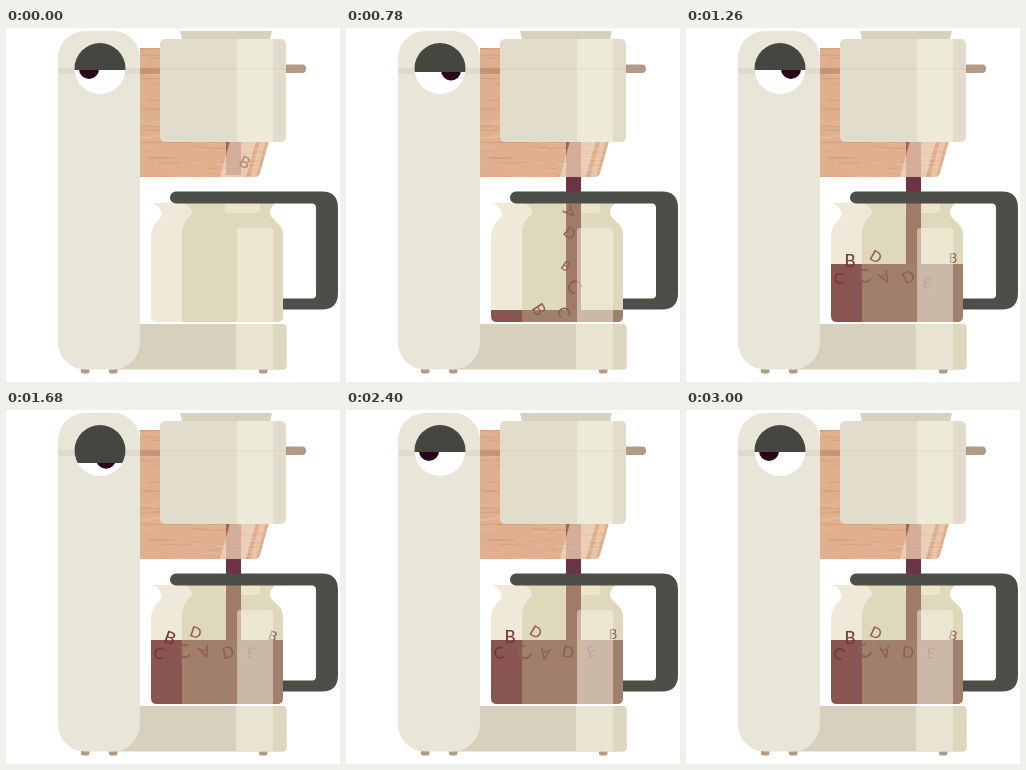
An HTML page with a canvas that plays this animation: 334x354 px, repeating every 3.06 s.

```html
<!DOCTYPE html>
<html lang="en">
<head>
<meta charset="utf-8">
<title>Coffee machine</title>
<style>
html, body { margin: 0; width: 100%; height: 100%; overflow: hidden; background: #fff; }
canvas { display: block; width: 334px; height: 354px; }
</style>
</head>
<body>
<canvas id="stage"></canvas>
<script>
const LOOP = 3060, W = 334, H = 354;
const canvas = document.getElementById('stage');
const dpr = window.devicePixelRatio || 1;
canvas.width = W * dpr;
canvas.height = H * dpr;
const c = canvas.getContext('2d');
c.scale(dpr, dpr);

const LID = [[0, 42], [60, 42], [300, 67], [480, 67], [660, 52], [780, 44], [840, 42],
  [1580, 42], [1680, 53], [1800, 67], [1920, 67], [2160, 42]];
const PUPIL = [[0, 83], [300, 83], [480, 105], [1560, 105], [1680, 100], [1860, 83]];
const LEVEL = [[570, 295], [780, 282], [1080, 252], [1260, 236], [1380, 231], [1500, 230]];
const TURN_AT = [1260, 1680, 2400, 3000];

// ch: glyph, size, x and dy: floating place, start: release time, turns: angles at TURN_AT
const LETTERS = [
  { ch: 'B', size: 17, x: 164, dy: -3, start: 298, turns: [0, 20, 0, 0] },
  { ch: 'C', size: 16, x: 153, dy: 13, start: 400, turns: [0, 10, -12, 25] },
  { ch: 'C', size: 19, x: 178, dy: 12, start: 490, turns: [-15, -8, -35, -30] },
  { ch: 'B', size: 13, x: 267, dy: -5, start: 515, turns: [0, 20, 0, 15] },
  { ch: 'D', size: 15, x: 190, dy: -8, start: 561, turns: [30, 18, 32, 25] },
  { ch: 'A', size: 16, x: 199, dy: 13, start: 596, turns: [150, 160, 190, 170] },
  { ch: 'D', size: 16, x: 222, dy: 12, start: 640, turns: [-25, -12, 8, 5] },
  { ch: 'E', size: 15, x: 245, dy: 12, start: 690, turns: [30, 15, -15, 10] }
];

const BODY = new Path2D('M147 175C152 178 159 184 154 190C149 195 145 200 145 210V288Q145 294 151 294H271Q277 294 277 288V207C277 195 266 193 264 186Q263 181 269 175Z');
const FRONT = new Path2D('M178 175Q189 181 185 187Q176 194 176 206V294H277V175Z');
const WOOD = new Path2D('M134 20H160V113H263L254 145Q253 149 248 149H134Z');

const clamp = v => Math.max(0, Math.min(1, v));
const ease = v => (1 - Math.cos(Math.PI * clamp(v))) / 2;

function at(keys, t) {
  if (t <= keys[0][0]) return keys[0][1];
  for (let i = 1; i < keys.length; i++) {
    const [t0, a] = keys[i - 1], [t1, b] = keys[i];
    if (t <= t1) return a + (b - a) * (t - t0) / (t1 - t0);
  }
  return keys[keys.length - 1][1];
}

function rect(color, x, y, w, h, r = 0) {
  c.fillStyle = color;
  c.beginPath();
  c.roundRect(x, y, w, h, r);
  c.fill();
}

function poly(color, ...pts) {
  c.fillStyle = color;
  c.beginPath();
  for (let i = 0; i < pts.length; i += 2) c.lineTo(pts[i], pts[i + 1]);
  c.fill();
}

function disc(color, x, y, r) {
  c.fillStyle = color;
  c.beginPath();
  c.arc(x, y, r, 0, 7);
  c.fill();
}

function clipped(path, draw) {
  c.save();
  c.clip(path);
  draw();
  c.restore();
}

function grain() {
  let seed = 7;
  const rnd = () => (seed = seed * 16807 % 2147483647) / 2147483647;
  c.lineWidth = 0.7;
  for (let i = 0; i < 150; i++) {
    const x = 120 + rnd() * 130, y = 20 + rnd() * 130, len = 8 + rnd() * 30, bend = rnd() * 4 - 2;
    c.strokeStyle = rnd() < 0.6 ? 'rgba(188,124,88,.38)' : 'rgba(244,206,178,.5)';
    c.beginPath();
    c.moveTo(x, y);
    c.quadraticCurveTo(x + len / 2, y + bend, x + len, y);
    c.stroke();
  }
}

function drawMachine(fallEnd, t) {
  clipped(WOOD, () => {
    rect('#dfaf8e', 130, 15, 140, 140);
    grain();
    rect('rgba(150,105,75,.35)', 134, 40, 20, 6);
    rect('rgba(132,58,42,.65)', 220, 113, 15, Math.min(fallEnd, 149) - 113);
    poly('rgba(245,228,210,.58)', 224, 113, 250, 113, 240, 149, 214, 149);
    poly('rgba(245,228,210,.4)', 254, 113, 260, 113, 250, 149, 244, 149);
    if (t < 298) glyph('B', 16, 239 - 10 * ease(t / 298), 134, 25, '#b58b74');
  });

  poly('#d7d2bf', 174, 3, 266, 3, 264, 11, 176, 11);
  rect('#b39a86', 276, 36.5, 24, 8.5, 4);
  rect('#e1dccb', 154, 11, 126, 103, 5);
  rect('#eeead8', 231, 11, 36, 103);
  rect('rgba(190,180,155,.16)', 154, 40, 126, 1.5);

  for (const x of [75, 103, 253]) rect('#b39a86', x, 340, 8.5, 5.5, [0, 0, 2, 2]);
  rect('#d6d0bd', 100, 296, 180.5, 45.5, 4);
  rect('#e9e3d1', 230, 296, 37, 45.5);
  rect('#ddd7c0', 267, 296, 13.5, 45.5, [0, 4, 4, 0]);
  rect('#e8e5d9', 52, 3, 82, 338.5, 27);
  rect('#dedace', 52, 40, 82, 6);
}

function drawEye(t) {
  const lid = at(LID, t);
  const eye = new Path2D();
  eye.arc(94, 40.5, 25.5, 0, 7);
  clipped(eye, () => {
    rect('#fff', 68, 14, 53, 53);
    disc('#2a0419', at(PUPIL, t), 41 + (lid - 42) * 0.7, 10);
    rect('#45463f', 68, 14, 53, lid - 14);
  });
}

function glyph(ch, size, x, y, angle, color) {
  c.save();
  c.translate(x, y);
  c.rotate(angle * Math.PI / 180);
  c.font = `500 ${size}px Lato, Roboto, sans-serif`;
  c.textAlign = 'center';
  c.textBaseline = 'middle';
  c.fillStyle = color;
  c.fillText(ch, 0, 1);
  c.restore();
}

function letterPose(l, i, t, level) {
  const age = t - l.start;
  const float = ease((age - 300) / 370);
  const fallX = 224 + [-3, 2, 4, -4, 0, 0, 3, -2][i];
  const fallY = Math.min(134 + 0.00148 * age * age, 284);
  const restY = Math.min(level + l.dy, 286);
  const turn = at(TURN_AT.map((time, k) => [time, l.turns[k]]), t);
  return {
    x: fallX + (l.x - fallX) * float,
    y: fallY + (restY - fallY) * float + Math.sin(t / 230 + i * 2) * 0.8 * float,
    angle: turn + (1 - float) * (110 - i * 25)
  };
}

function drawPot(t, fallEnd, level) {
  const live = LETTERS.map((l, i) => ({ ...l, ...letterPose(l, i, t, level) }))
    .filter(l => t >= l.start);

  c.save();
  c.beginPath();
  c.rect(200, 149, 60, 20);
  c.clip();
  for (const l of live) if (l.y < 172) glyph(l.ch, l.size, l.x, l.y, l.angle, '#2a0d19');
  c.restore();
  if (fallEnd > 149) rect('#6b3345', 220, 149, 15, Math.min(fallEnd, 175) - 149);

  clipped(BODY, () => {
    rect('#efe9da', 140, 170, 140, 130);
    c.fillStyle = '#dfd8bb';
    c.fill(FRONT);
    rect('#ece5cc', 219, 172, 35, 13, 3);
    if (fallEnd > 175) rect('#a07c68', 220, 175, 15, Math.min(fallEnd, 294) - 175);
    if (level < 295) {
      rect('#895550', 145, level, 31, 295 - level);
      rect('#a1806b', 176, level, 101, 295 - level);
    }
    for (const l of live) {
      if (l.y > 166) glyph(l.ch, l.size, l.x, l.y, l.angle, l.x < 174 ? '#78343c' : '#8f5f55');
    }
    rect('rgba(248,244,232,.48)', 231, 200, 36, 94, [3, 3, 0, 0]);
  });

  c.fillStyle = '#4d4e47';
  c.fill(new Path2D('M170 163.5H316Q332 163.5 332 180V265Q332 281.5 316 281.5H277V270.5H306Q310 270.5 310 266.5V180Q310 175.5 306 175.5H170A6 6 0 0 1 170 163.5Z'));
}

function draw(t) {
  const drop = Math.max(0, t - 242);
  const fallEnd = Math.min(147 + 0.00148 * drop * drop, 295);
  c.fillStyle = '#fff';
  c.fillRect(0, 0, W, H);
  drawMachine(fallEnd, t);
  drawEye(t);
  drawPot(t, fallEnd, at(LEVEL, t));
}

const begin = performance.now();
function tick() {
  const t = (performance.now() - begin) % LOOP;
  draw(Math.floor(t / 60) * 60);
  requestAnimationFrame(tick);
}
tick();
</script>
</body>
</html>
```
